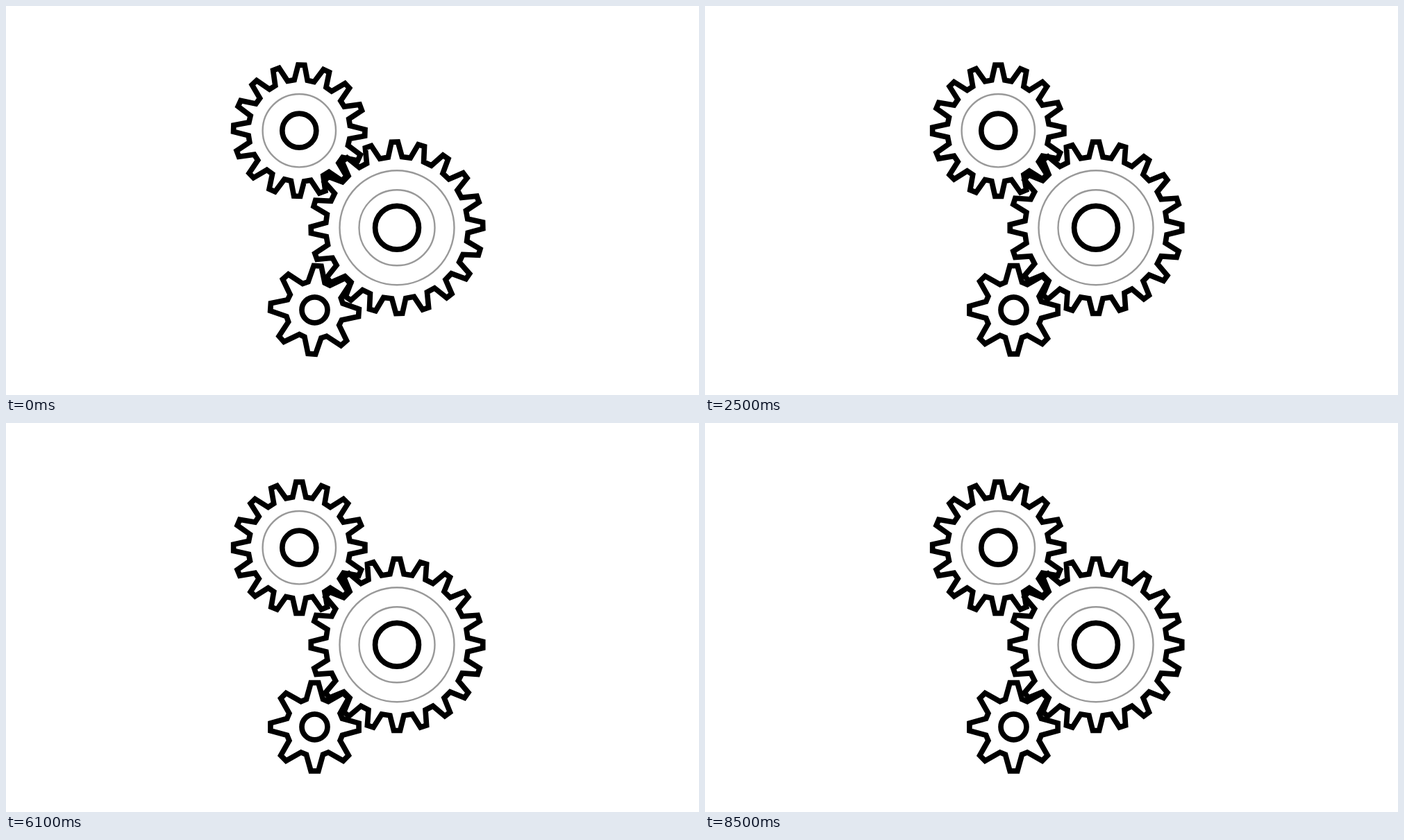
Write an HTML page that moves like this. It is 998 by 561 pixels and loops after 8.6 s.

```html
<!DOCTYPE html>
<html lang="en">
<head>
<meta charset="utf-8">
<title>Meshing gears</title>
<style>
  html, body { margin: 0; width: 100%; height: 100%; overflow: hidden; background: #fff; }
  svg { display: block; width: 100%; height: 100%; }
  path, circle { fill: none; stroke: #000; stroke-width: 7.7; }
  .groove { stroke: #999; stroke-width: 2.4; }
</style>
</head>
<body>
<svg id="stage" viewBox="0 0 998 561"></svg>
<script>
const STEP_MS = 100, STEPS = 86, STEPS_PER_TOOTH = 12;

// tip and base give the tooth's half widths at the outer and root radii
const gears = [
  { x: 422.3, y: 179.7, teeth: 16, dir: -1, outer: 94.6, root: 72.8, tip: 4.6, base: 9.5, hub: 24.5, grooves: [52.7] },
  { x: 563, y: 319.8, teeth: 20, dir: 1, outer: 123.7, root: 102, tip: 4.6, base: 10, hub: 31.4, grooves: [82.5, 54.5] },
  { x: 444.5, y: 438.3, teeth: 8, dir: -1, outer: 63.6, root: 39.8, tip: 5.4, base: 12, hub: 18.5, grooves: [] }
];

function add(parent, tag, attrs) {
  const node = document.createElementNS("http://www.w3.org/2000/svg", tag);
  for (const name in attrs) node.setAttribute(name, attrs[name]);
  return parent.appendChild(node);
}

function outline({ teeth, outer, root, tip, base }) {
  const profile = [[-base, -root], [-tip, -outer], [tip, -outer], [base, -root]];
  const points = [];
  for (let i = 0; i < teeth; i++) {
    const a = i * 2 * Math.PI / teeth, c = Math.cos(a), s = Math.sin(a);
    for (const [x, y] of profile) {
      points.push(`${(x * c - y * s).toFixed(2)} ${(x * s + y * c).toFixed(2)}`);
    }
  }
  return `M${points.join("L")}Z`;
}

for (const gear of gears) {
  const group = add(stage, "g", { transform: `translate(${gear.x} ${gear.y})` });
  gear.rim = add(group, "path", { d: outline(gear) });
  for (const r of gear.grooves) add(group, "circle", { r, class: "groove" });
  add(group, "circle", { r: gear.hub });
}

function draw(now) {
  const step = Math.floor(now / STEP_MS) % STEPS;
  for (const { rim, teeth, dir } of gears) {
    const angle = dir * (step - 1) * 360 / teeth / STEPS_PER_TOOTH;
    rim.setAttribute("transform", `rotate(${angle})`);
  }
  requestAnimationFrame(draw);
}
draw(performance.now());
</script>
</body>
</html>
```
